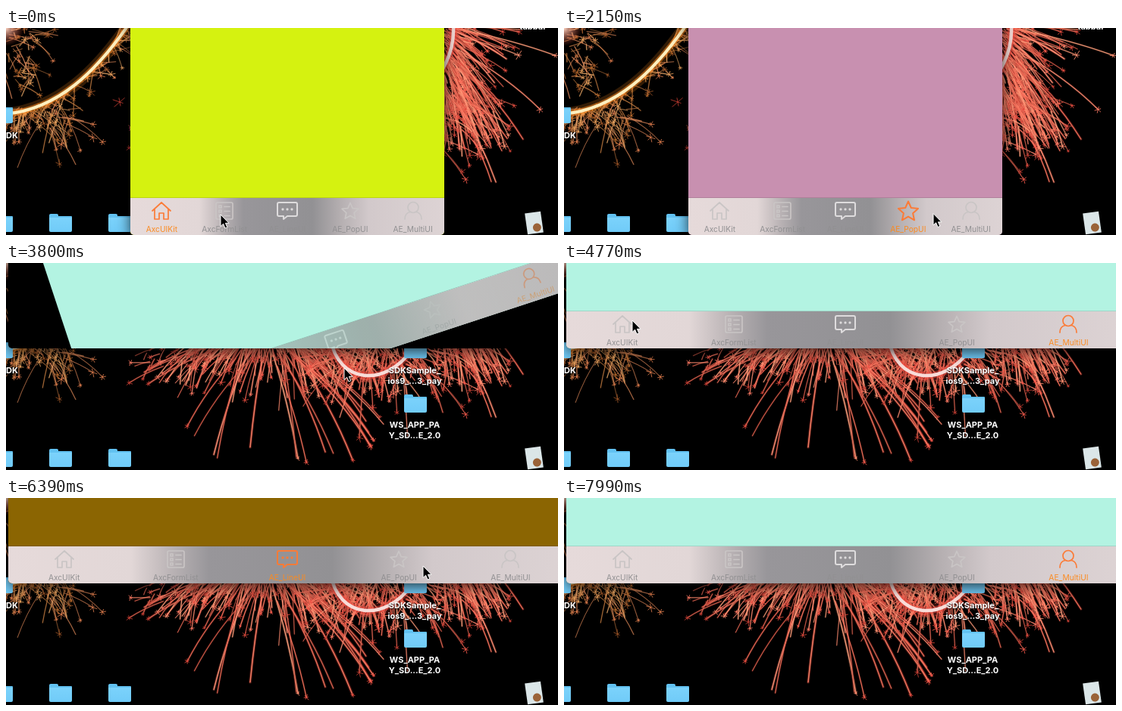
These frames come from a looping animation (728x274 px, 8090 ms). An HTML page with a canvas:

```html
<!DOCTYPE html>
<html lang="en">
<head>
<meta charset="utf-8">
<title>Tab bar demo</title>
<style>
html, body { margin: 0; width: 100%; height: 100%; overflow: hidden; background: #000; }
#stage { position: relative; width: 728px; height: 274px; overflow: hidden; font-family: Inter, Roboto, sans-serif; }
#stage > * { position: absolute; }
#sky { left: 0; top: 0; }
.folder { width: 30px; height: 21px; border-radius: 1px 1px 2px 2px; background: linear-gradient(#62c2f2 2px, #7bd2fb 2px, #70cbf8); }
.folder::before { content: ""; position: absolute; left: 0; top: -3px; width: 12px; height: 4px; border-radius: 2px 2px 0 0; background: #62c2f2; }
.name { width: 100px; color: #fff; font: 700 11px/14px Inter, Roboto, sans-serif; text-align: center; white-space: pre; text-shadow: 0 1px 2px #000; }
#file { left: 686px; top: 244px; width: 21px; height: 28px; background: #dbe6e8; transform: rotate(-8deg); }
#file::after { content: ""; position: absolute; left: 8px; top: 15px; width: 11px; height: 11px; border-radius: 50%; background: #9a6238; }
#win { overflow: hidden; background: #000; border-radius: 0 0 5px 5px; box-shadow: 0 4px 18px rgba(0,0,0,.75); }
#app { position: absolute; left: 50%; top: 50%; }
#bar {
  position: absolute; left: 0; right: 0; bottom: 0; height: 49px; display: flex;
  box-shadow: 0 -.6px rgba(0,0,0,.2);
  background: linear-gradient(90deg, #e6dada, #e2d7d7 22%, #bbb4b6 29%, #98969a 36%, #929194 58%, #b5afb1 67%, #d2c9cb 76%, #ddd3d4);
}
#shade { position: absolute; inset: 0; background: linear-gradient(90deg, #aeeedd 30%, #a6c6bc 55%, #b2b8b6 75%, #a4a8a8); }
.tab { position: relative; flex: 1; color: #c9c5c5; }
.tab svg { position: absolute; left: 50%; top: 16.5px; overflow: visible; fill: none; stroke: currentColor; stroke-width: 1.7; stroke-linejoin: round; stroke-linecap: round; }
.tab span { position: absolute; left: 0; right: 0; top: 34px; text-align: center; font-size: 10.2px; line-height: 14px; color: #919092; }
.tab:nth-child(3) { color: #dedcdd; }
.tab:nth-child(3) svg { stroke-width: 2; }
.tab.on { color: #fb7b37; }
.tab.on span { color: #fb8a20; }
#cursor { left: 0; top: 0; overflow: visible; }
</style>
</head>
<body>
<div id="stage">
  <canvas id="sky" width="728" height="274"></canvas>
  <div id="file"></div>
  <div id="win"><div id="app"><div id="bar"></div></div></div>
  <svg id="cursor" width="12" height="19"><path d="M0 0V15.5L3.6 12.2 6 18 8.8 16.8 6.4 11.3H11Z" stroke="#fff"/></svg>
</div>
<script>
const $ = id => document.getElementById(id);
const add = (el, html, where = 'beforeend') => el.insertAdjacentHTML(where, html);

// ---------- desktop ----------
let seed = 7;
function rnd(a = 0, b = 1) {
  seed = (seed * 16807) % 2147483647;
  return a + (b - a) * seed / 2147483647;
}
const ctx = $('sky').getContext('2d');
ctx.lineCap = 'round';

function stroke(path, color, width, alpha = 1) {
  ctx.globalAlpha = alpha;
  ctx.strokeStyle = color;
  ctx.lineWidth = width;
  ctx.stroke(path);
}

function burst(x, y, r, color) {
  const p = new Path2D(), turn = rnd(0, 6);
  for (let i = 0; i < 6; i++) {
    const a = turn + i * 1.05, d = r * rnd(.4, 1);
    p.moveTo(x, y);
    p.lineTo(x + d * Math.cos(a), y + d * Math.sin(a));
  }
  stroke(p, color, 1, .85);
}

// A falling spark: soft halo, coloured streak, hot core
function spark(x, y, angle, len, color, width) {
  const dx = len * Math.cos(angle), dy = len * Math.sin(angle), p = new Path2D();
  p.moveTo(x, y);
  p.quadraticCurveTo(x + dx * .6, y + dy * .45, x + dx, y + dy);
  stroke(p, color, width * 2.4, .25);
  stroke(p, color, width, .9);
  stroke(p, '#ffd9a8', width * .45, .55);
  if (rnd() < .55) burst(x + dx, y + dy, rnd(3, 7), color);
}

const zone = (x0, x1, y0, y1) => () => [rnd(x0, x1), rnd(y0, y1)];

// Sparks born in a zone fly away from the focus
function fan(n, born, [fx, fy], spread, minLen, maxLen, colors, width = 1) {
  for (let i = 0; i < n; i++) {
    const [x, y] = born();
    const angle = Math.atan2(y - fy, x - fx) + rnd(-spread, spread);
    const len = minLen + (maxLen - minLen) * rnd() ** 2;
    spark(x, y, angle, len, colors[Math.floor(rnd(0, colors.length))], width * rnd(.7, 1.3));
  }
}

function trail(d, glow, core, width) {
  const p = new Path2D(d);
  stroke(p, glow, width * 4, .2);
  stroke(p, glow, width * 2, .5);
  stroke(p, core, width);
}

const red = ['#f4594a', '#e04a3e', '#ff7a64', '#c23e33', '#ff8f70'];
const gold = ['#b8692c', '#e8a05c', '#9a5426', '#d8784a'];
const onArc = () => { const u = rnd(); return [160 * u, 114 * (1 - u ** 1.9)]; };

fan(80, onArc, [70, 20], 1.4, 6, 50, gold, .7);
fan(60, zone(-5, 40, 0, 75), [0, 20], 1.5, 6, 40, gold, .7);
fan(60, zone(-5, 85, 105, 135), [40, 60], 1, 6, 65, gold, .7);
fan(280, zone(255, 440, 85, 118), [345, 50], .5, 8, 85, red);
fan(20, zone(285, 410, 100, 150), [345, 70], .3, 110, 170, red, 1.4);
fan(30, zone(185, 255, 105, 140), [300, 60], .7, 6, 50, red);
fan(200, zone(430, 570, 80, 145), [495, 50], .8, 8, 65, red);
fan(8, zone(440, 560, 120, 150), [495, 50], .3, 70, 115, red);
fan(190, zone(572, 605, -15, 95), [550, -20], .35, 8, 100, red);
fan(22, zone(582, 600, -10, 100), [550, -10], .2, 70, 150, red, 1.2);
fan(55, zone(580, 645, 85, 150), [550, 20], .6, 6, 60, red);
burst(150, 98, 10, red[3]);

trail('M160-2C120 55 70 108-2 114', '#ff8a1e', '#fff0c0', 4);
trail('M428 100C438 160 500 165 535 115S592 40 590-2', '#f0493f', '#f8dcd8', 4.5);
const glow = ctx.createRadialGradient(0, 0, 0, 0, 0, 24);
glow.addColorStop(0, '#ffd9c8');
glow.addColorStop(1, 'rgba(220,70,40,0)');
ctx.globalAlpha = 1;
ctx.fillStyle = glow;
ctx.fillRect(0, 0, 24, 24);

const item = (cls, x, y, text = '') =>
  add($('file'), `<div class="${cls}" style="left:${x}px;top:${y}px">${text}</div>`, 'beforebegin');
for (let i = 0; i < 3; i++) item('folder', 78 * i - 21, 249);
item('folder', -21, 105);
item('folder', 525, 105);
item('folder', 525, 177);
item('name', -42, 135, 'DK');
item('name', 645, -9, 'tabbar');
item('name', 489, 135, 'SDKSample_\nios9_...3_pay');
item('name', 489, 207, 'WS_APP_PA\nY_SD...E_2.0');

// ---------- tab bar ----------
let star = '';
for (let i = 0; i < 10; i++) {
  const r = i % 2 ? 5.4 : 11.5, a = i * Math.PI / 5;
  star += (i ? 'L' : 'M') + r * Math.sin(a) + ' ' + (1 - r * Math.cos(a));
}
const rows = [-7, -1, 5].map(y => `M-7 ${y}h3v3h-3zM0 ${y + 1.5}H7`).join('');
const dots = [-6, 0, 6].map(x => `M${x - .5}-2.5h1v1h-1z`).join('');
const tabs = [
  ['AxcUIKit', '#d5f210', 'M-12 0 0-11 12 0M-9-2V11H-3V3H3V11H9V-2'],
  ['AxcFormList', '#5f9fd0', 'M-9-11H9q2 0 2 2V9q0 2-2 2H-9q-2 0-2-2V-9q0-2 2-2' + rows],
  ['AE_LineUI', '#8b6502', 'M-11-11H11q2 0 2 2V5q0 2-2 2H0L-5 11V7H-11q-2 0-2-2V-9q0-2 2-2' + dots],
  ['AE_PopUI', '#c890b0', star + 'Z'],
  ['AE_MultiUI', '#b3f3e2', 'M0-11.5a7 7 0 0 1 0 14a7 7 0 0 1 0-14M-11 11Q-11 3-4 1.5M11 11Q11 3 4 1.5']
];
tabs.forEach(([label, , d]) =>
  add($('bar'), `<div class="tab"><svg width="1" height="1"><path d="${d}"/></svg><span>${label}</span></div>`));
add($('bar'), '<div id="shade"></div>');
const items = [...document.querySelectorAll('.tab')];
const icons = items.map(el => el.querySelector('path'));

// ---------- timeline ----------
const LOOP = 8090, TURN = 3500;
// Each step picks a tab, then the pointer travels to x, y
const steps = [
  // time, travel, tab, x, y
  [0, 1, 0, 283, 247],
  [530, 320, 1, 377, 254],
  [1330, 290, 2, 446, 245],
  [2030, 240, 3, 527, 246],
  [2450, 400, 4, 446, 139],
  [4060, 680, 4, 90, 76],
  [4830, 290, 0, 219, 91],
  [5360, 440, 1, 375, 90],
  [5890, 460, 2, 550, 90],
  [6450, 300, 3, 672, 90],
  [7040, 640, 4, 560, 280]
];
const ease = u => (1 - Math.cos(Math.PI * Math.min(1, Math.max(0, u)))) / 2;
const mix = (a, b, u) => a + (b - a) * u;

function box(el, w, h) {
  el.style.width = w + 'px';
  el.style.height = h + 'px';
}

function draw(t) {
  const wide = t >= TURN, p = ease((t - TURN - 20) / 400);
  const win = $('win'), app = $('app');
  const W = wide ? 736 : 414, H = 1150 - W;
  box(win, W, H);
  win.style.left = 371 - W / 2 + 'px';
  win.style.top = -94 - H / 2 + 'px';
  box(app, mix(414, 736, p), mix(736, 414, p));
  app.style.transform = `translate(-50%,-50%) rotate(${wide ? 90 * (p - 1) : 0}deg)`;
  $('shade').style.opacity = Math.sin(Math.PI * p);

  const n = steps.filter(s => s[0] <= t).length - 1;
  const [time, travel, tab, x, y] = steps[n], from = steps[Math.max(0, n - 1)];
  app.style.background = tabs[tab][1];
  const pop = 1 + .2 * Math.sin(Math.PI * Math.min(1, (t - time) / 300));
  items.forEach((el, i) => {
    el.classList.toggle('on', i === tab);
    icons[i].setAttribute('transform', `scale(${i === tab && tab !== from[2] ? pop : 1})`);
  });

  const u = ease((t - time) / travel);
  $('cursor').style.transform = `translate(${mix(from[3], x, u)}px,${mix(from[4], y, u)}px)`;
}

const start = performance.now();
function tick() {
  draw((performance.now() - start) % LOOP);
  requestAnimationFrame(tick);
}
tick();
</script>
</body>
</html>
```
